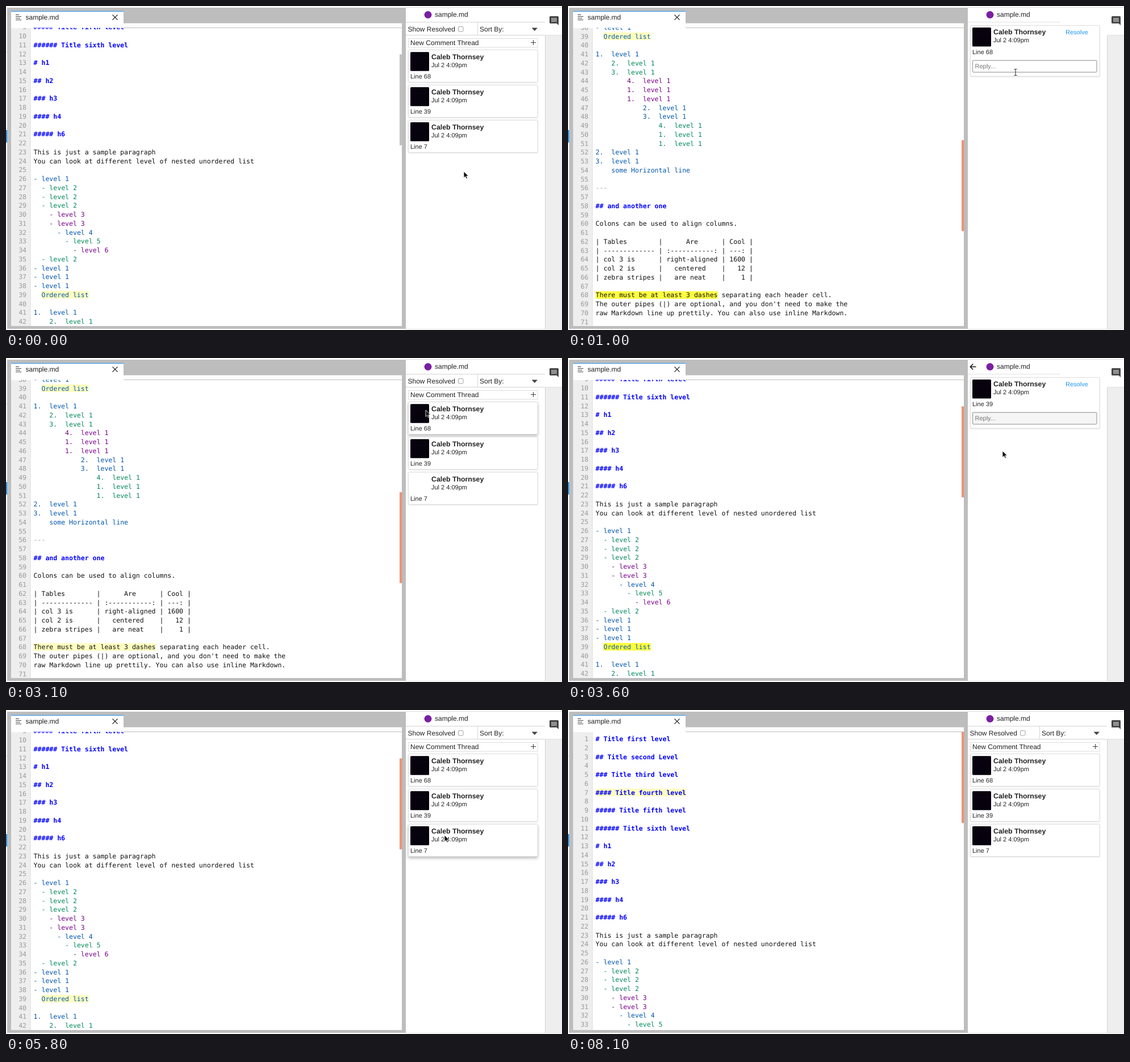
These frames come from a looping animation (979 by 572 pixels, 8400 ms). An HTML page:

```html
<!DOCTYPE html>
<html lang="en">
<head>
<meta charset="utf-8">
<title>Comment threads</title>
<style>
  html, body { margin: 0; width: 100%; height: 100%; overflow: hidden; background: #fff; }
  svg { display: block; }
  text { font-family: "Liberation Sans", Arial, sans-serif; white-space: pre; text-rendering: geometricPrecision; }
  .code { font-family: "DejaVu Sans Mono", monospace; }
  .card { fill: #fff; stroke: #dcdcdc; filter: drop-shadow(0 1px 1px rgba(0,0,0,.1)); }
  .card.hover { filter: drop-shadow(0 3px 2.5px rgba(0,0,0,.25)); }
</style>
</head>
<body>
<svg id="stage" width="979" height="572" viewBox="0 0 979 572"></svg>
<script>
const LOOP = 8400, STEP = 100;
const LINE = 15.75, CODE_SIZE = 11.525, COL = 6.938, CODE_X = 48.6, FIRST_Y = 51;
const AUTHOR = 'Caleb Thornsey';
const THREADS = [68, 39, 7];
const LIST_COLORS = ['#0055aa', '#008855', '#770088'];

const DOC = `# Title first level

## Title second Level

### Title third level

#### Title fourth level

##### Title fifth level

###### Title sixth level

# h1

## h2

### h3

#### h4

##### h6

This is just a sample paragraph
You can look at different level of nested unordered list

- level 1
  - level 2
  - level 2
  - level 2
    - level 3
    - level 3
      - level 4
        - level 5
          - level 6
  - level 2
- level 1
- level 1
- level 1
  Ordered list

1.  level 1
    2.  level 1
    3.  level 1
        4.  level 1
        1.  level 1
        1.  level 1
            2.  level 1
            3.  level 1
                4.  level 1
                1.  level 1
                1.  level 1
2.  level 1
3.  level 1
    some Horizontal line

---

## and another one

Colons can be used to align columns.

| Tables        |      Are      | Cool |
| ------------- | :-----------: | ---: |
| col 3 is      | right-aligned | 1600 |
| col 2 is      |   centered    |   12 |
| zebra stripes |   are neat    |    1 |

There must be at least 3 dashes separating each header cell.
The outer pipes (|) are optional, and you don't need to make the
raw Markdown line up prettily. You can also use inline Markdown.
`.split('\n');

// line: [first column, length]
const MARKS = { 7: [0, 23], 39: [2, 12], 68: [0, 31] };

// [time, scroll, open thread or 0 for the list]
const VIEWS = [
  [0, 139.75, 0], [1000, 596, 68], [3000, 596, 0], [3600, 139.75, 39],
  [5000, 139.75, 0], [6100, 0, 7], [7400, 0, 0]
];

// [start, steps, x, y, shape]
const MOVES = [
  [0, 1, 806, 292], [100, 9, 788, 117], [1000, 1, 788, 117, 'beam'],
  [1300, 3, 776, 163], [1600, 4, 700, 52], [2000, 2, 707, 26],
  [2200, 2, 709, 17], [2400, 1, 711, 14, 'hand'],
  [3000, 1, 713, 20], [3100, 2, 765, 164],
  [4000, 1, 750, 148], [4300, 4, 713, 25], [4800, 1, 711, 18, 'hand'],
  [5000, 1, 714, 27], [5100, 3, 757, 160], [5500, 4, 772, 221],
  [6400, 2, 752, 97], [6800, 1, 726, 36], [6900, 2, 722, 24], [7100, 2, 716, 15, 'hand'],
  [7400, 1, 716, 22], [7500, 1, -30, -30],
  [7900, 1, 192, 0], [8000, 1, 118, 0], [8100, 1, -30, -30]
];

const rect = (x, y, w, h, fill, extra = '') =>
  `<rect x="${x}" y="${y}" width="${w}" height="${h}" fill="${fill}" ${extra}/>`;
const path = (d, color, width = 1, extra = '') =>
  `<path d="${d}" fill="none" stroke="${color}" stroke-width="${width}" ${extra}/>`;
const label = (str, x, midY, size = 12, fill = '#222', extra = '') =>
  `<text x="${x}" y="${midY + size * .35}" font-size="${size}" fill="${fill}" ${extra}>${str}</text>`;
const group = (id, body, extra = '') => `<g id="${id}" ${extra}>${body}</g>`;

function codeColor(str) {
  if (str.startsWith('#')) return '#0000ff';
  if (str === '---') return '#999';
  const item = str.match(/^( *)(-|\d\.) /);
  if (item) return LIST_COLORS[item[1].length / (item[2] === '-' ? 2 : 4) % 3];
  return str.startsWith(' ') ? LIST_COLORS[0] : '#111';
}

function codeLine(str, i) {
  const y = FIRST_Y + i * LINE, indent = str.length - str.trimStart().length;
  const mark = MARKS[i + 1];
  return (mark ? rect(CODE_X + mark[0] * COL, y - 6.7, mark[1] * COL, 13.4, '#ffffbf', `id="mark${i + 1}"`) : '') +
    label(i + 1, 36, y, CODE_SIZE, '#999', 'class="code" text-anchor="end"') +
    label(str.trimStart(), CODE_X + indent * COL, y, CODE_SIZE, codeColor(str),
      `class="code" ${str.startsWith('#') ? 'font-weight="bold"' : ''}`);
}

const avatar = (y, id) => group(id,
  rect(712, y, 33, 33.5, '#06020d', 'rx="1.5"') +
  path(`M712 ${y + 10.5}h33M720.5 ${y}v33M738.5 ${y + 4}v28`, '#1a0628', .6, 'stroke-dasharray="2 1.5"'));

const author = (y, dateId) =>
  label(AUTHOR, 749, y + 12.2, 12.3, '#222', 'font-weight="bold"') +
  label('Jul 2 4:09pm', 749, y + 27, 11, '#222', `id="${dateId}"`);

const listCard = (line, i) => {
  const y = 77 + i * 62;
  return rect(708.5, y + .5, 227.5, 57, '#fff', `class="card" id="card${i}" rx="1"`) +
    avatar(y + 4.2, 'avatar' + i) + author(y, 'date' + i) + label('Line ' + line, 712, y + 47.5, 11);
};

const editor =
  rect(2, 3, 702, 567, '#bdbdbd') +
  rect(0, 219, 2, 22, '#2196f3') + rect(0, 81, 2, 1, '#ddd') +
  rect(207, 30.5, 490, 7.5, '#fff') +
  rect(9, 9, 198, 30, '#fff') + rect(9, 9, 198, 1, '#2196f3') +
  path('M17 15.5h6M17 18.5h10M17 21.5h8M17 24.5h10', '#444', 1.2) +
  path('M187.5 15.5l9 9m0-9l-9 9', '#333', 1.3) +
  label('sample.md', 34.5, 20) +
  rect(9, 39, 688, 526, '#fff') + rect(9, 39, 34, 526, '#eee') + rect(42.5, 39, 1, 526, '#ddd') +
  `<g clip-path="url(#page)">${group('code', DOC.map(codeLine).join(''))}</g>` +
  rect(693, 39, 4.5, 160.5, '#e9967a', 'id="thumb"');

const panel =
  rect(704, 2, 275, 1, '#ddd') + rect(704, 570, 275, 1, '#e4e4e4') +
  rect(949, 52, 30, 518, '#eee') + rect(949, 52, 1, 518, '#d4d4d4') + rect(949, 51, 30, 1, '#e0e0e0') +
  '<path d="M958.5 18h13q1.5 0 1.5 1.5V34l-3.2-3.2H958.5q-1.5 0-1.5-1.5V19.5q0-1.5 1.5-1.5Z" fill="#424242"/>' +
  path('M960 22h10M960 24.5h10M960 27h10', '#fff', 1.1) +
  '<circle cx="743" cy="15.5" r="6.5" fill="#7b1fa2"/>' +
  label('sample.md', 755, 15.2) +
  group('back', path('M718.5 15.5H708.5M713.3 10.5L708.3 15.5L713.3 20.5', '#111', 1.5));

const list =
  path('M704 28.5H949M704 51.5H949M830.5 29V51', '#d4d4d4') +
  label('Show Resolved', 707.5, 41) +
  rect(796.5, 36.5, 8.5, 8.5, '#fff', 'stroke="#8a8a8a" stroke-width=".8" rx="1.5"') +
  label('Sort By:', 834, 41) + '<path d="M925.5 38.5h10.5l-5.25 5.5z" fill="#444"/>' +
  rect(708.5, 57.5, 227.5, 15.5, '#fff', 'stroke="#dcdcdc"') +
  label('New Comment Thread', 712, 65) + path('M924 64.5h9M928.5 60v9', '#444', 1.1) +
  THREADS.map(listCard).join('');

const thread =
  path('M704 28.5H866', '#e2e2e2') +
  rect(708.5, 34.5, 227.5, 89.5, '#fff', 'class="card" rx="1"') +
  avatar(38, 'avatar') + author(33.2, 'date') +
  label('• Edit', 809.5, 60.2, 11, '#222', 'id="edit"') +
  label('Resolve', 876, 46, 11, '#2196f3') + label('', 712, 81, 11, '#222', 'id="line"') +
  rect(712.5, 96.2, 218.5, 20.6, '#f5f5f5', 'id="reply" stroke="#a0a0a0" stroke-width="1.2" rx="1.5"') +
  label('Reply...', 716.5, 106, 11, '#777');

const shape = (id, d) => `<path id="${id}" d="${d}" fill="#111" stroke="#fff" stroke-width=".8"/>`;
const pointer = group('pointer',
  shape('arrow', 'M0 0V11.5L2.7 9L4.5 13L6.5 12.1L4.7 8.2H8.4Z') +
  shape('hand', 'M.3 -.7q1.4 0 1.4 1.4V4l5.2 1.1q1.8.5 1.6 2.2L7.9 12H1.4L-2.6 7.4q-.5-1.6 1.5-.8V.7Q-1.1-.7 .3-.7Z') +
  group('beam', path('M-2.5 -5.5H2.5M0 -5.5V5.5M-2.5 5.5H2.5', '#333', 1.1)));

document.getElementById('stage').innerHTML =
  '<clipPath id="page"><rect x="9" y="38.5" width="684" height="526.5"/></clipPath>' +
  editor + panel + group('list', list) + group('thread', thread) + pointer;

const $ = id => document.getElementById(id);
const show = (id, on) => { $(id).style.display = on ? '' : 'none'; };
const latest = (table, t) => table.findLastIndex(row => row[0] <= t);
const inside = (p, y0, y1) => p.x >= 708 && p.x <= 936 && p.y >= y0 && p.y <= y1;

function pointerAt(t) {
  const i = latest(MOVES, t);
  const [start, steps, x, y, kind = 'arrow'] = MOVES[i];
  const from = MOVES[Math.max(0, i - 1)];
  const k = Math.min(1, ((t - start) / STEP + 1) / steps);
  return { x: from[2] + (x - from[2]) * k, y: from[3] + (y - from[3]) * k, kind };
}

function draw(time) {
  const t = Math.floor(time % LOOP / STEP) * STEP;
  const [since, scroll, open] = VIEWS[latest(VIEWS, t)];
  const p = pointerAt(t);

  $('code').setAttribute('transform', `translate(0 ${-scroll})`);
  $('thumb').setAttribute('y', 39 + scroll * .332);
  $('thumb').setAttribute('fill', t < 100 ? '#c1c1c1' : '#e9967a');
  for (const line of THREADS) $('mark' + line).setAttribute('fill', line === open ? '#ffff40' : '#ffffbf');

  show('list', !open);
  show('thread', open);
  show('back', open && t !== 1000);
  THREADS.forEach((_, i) => {
    show('avatar' + i, since === 0 || t - since >= i * STEP);
    $('card' + i).classList.toggle('hover', inside(p, 77 + i * 62, 135 + i * 62));
  });

  const editing = inside(p, 34, 95);
  $('line').textContent = 'Line ' + open;
  $('date').textContent = editing ? 'Jul 2 4:0…' : 'Jul 2 4:09pm';
  show('edit', editing);
  $('reply').setAttribute('fill', inside(p, 96, 118) ? '#fff' : '#f5f5f5');

  $('pointer').setAttribute('transform', `translate(${p.x} ${p.y})`);
  for (const kind of ['arrow', 'hand', 'beam']) show(kind, kind === p.kind);
}

const begin = performance.now();
function tick() {
  draw(performance.now() - begin);
  requestAnimationFrame(tick);
}
tick();
</script>
</body>
</html>
```
